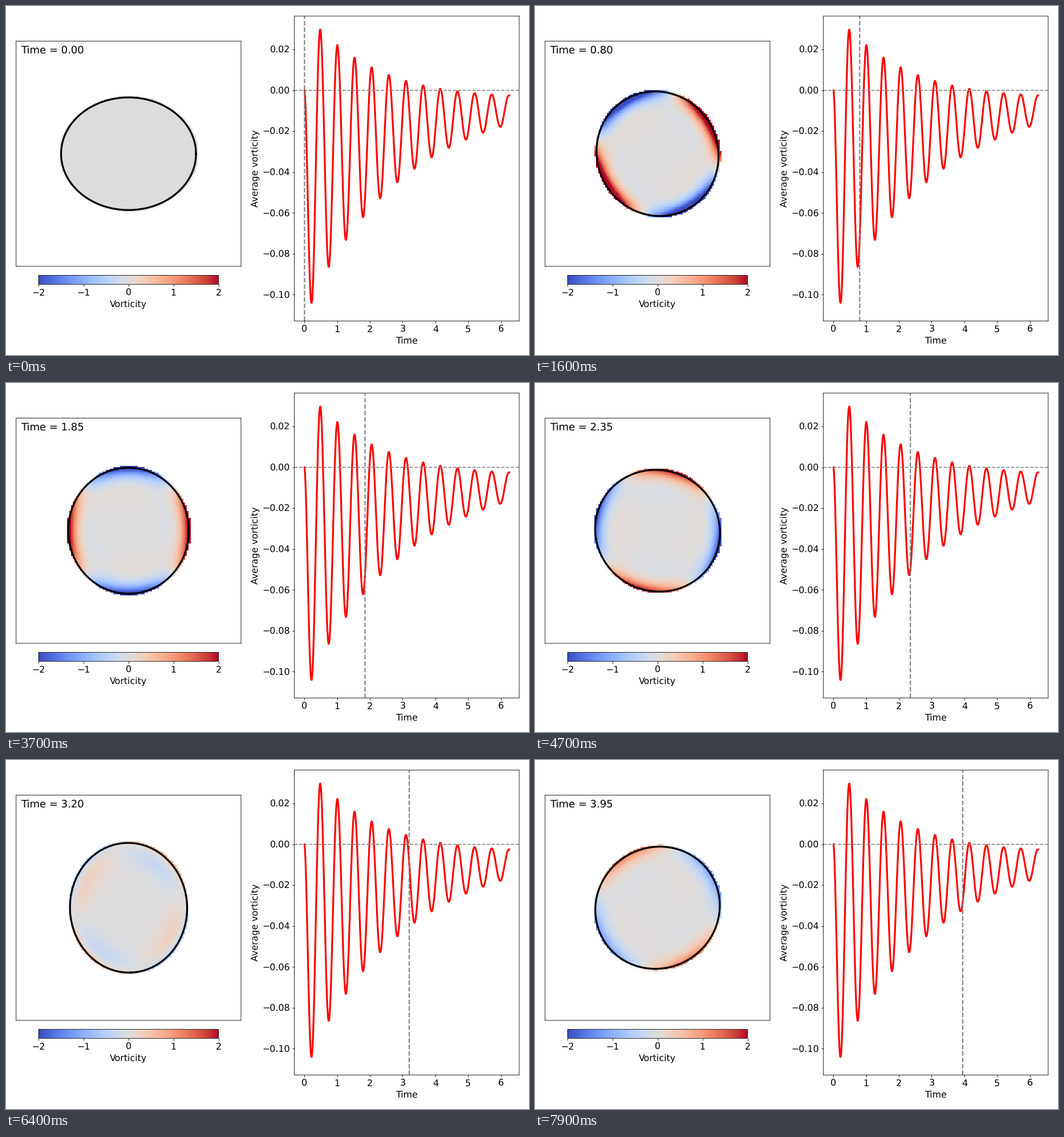
A matplotlib script that plays this animation: 917 px wide and 611 px high, repeating every 8 s.

```python
import numpy as np
import matplotlib.pyplot as plt
from matplotlib.animation import FuncAnimation

W, H, DPI = 917, 611, 64
S = 76.4 / DPI          # scales point sizes to the stage
FRAMES, DT = 80, 0.05

plt.rcParams.update({
    "font.family": "DejaVu Sans", "font.size": 15 * S,
    "text.hinting": "no_hinting", "path.snap": False,
    "axes.linewidth": 0.8 * S, "axes.labelpad": 4 * S,
    **{f"{a}tick.major.{k}": v * S for a in "xy"
       for k, v in (("size", 3.5), ("width", 0.8), ("pad", 3.5))},
})

fig = plt.figure(figsize=(W / DPI, H / DPI), dpi=DPI, facecolor="white")


def px_axes(left, top, right, bottom):
    return fig.add_axes([left / W, 1 - bottom / H, (right - left) / W, (bottom - top) / H])


drop = px_axes(17.7, 61.5, 412, 455.8)
bar = px_axes(57.1, 471.5, 372.5, 487.3)
plot = px_axes(505.5, 17.7, 899.8, 551.4)

# --- deforming drop -------------------------------------------------------
R = np.sqrt(1.2)
ROT, OMEGA = 1.0, 6.0   # precession and oscillation rates
NU = 0.11               # viscosity
NX, NY = 128, 160
X, Y = np.meshgrid((np.arange(NX) + 0.5) * 4 / NX - 2, (np.arange(NY) + 0.5) * 4 / NY - 2)
XY = X + 1j * Y
TURN = np.exp(1j * np.linspace(0, 2 * np.pi, 241))


def shape(t):
    """Log half-axis ratio and tilt of the ellipse."""
    p = 0.0912 * np.exp(-0.17 * t) * np.cos(OMEGA * t)
    q = 0.02 * np.sin(OMEGA * t)
    z = np.exp(-1j * ROT * t) * (p + 1j * q)
    return abs(z), np.angle(z) / 2


def outline(t):
    e, tilt = shape(t)
    return R * np.exp(1j * tilt) * (np.exp(e) * TURN.real + 1j * np.exp(-e) * TURN.imag)


def vorticity(t):
    """Two-lobed viscous boundary layer under the moving surface."""
    e, tilt = shape(t)
    local = XY * np.exp(-1j * tilt) / R
    rho = np.hypot(local.real * np.exp(-e), local.imag * np.exp(e))
    depth = R * (1 - rho)
    slow, fast = OMEGA - ROT, OMEGA + ROT
    k1, k2 = np.sqrt(slow / (2 * NU)), np.sqrt(fast / (2 * NU))
    wave = (np.exp(1j * slow * t - k1 * depth * (1 + 1j))
            - np.exp(-1j * fast * t - k2 * depth * (1 - 1j)))
    grown = np.exp(-depth ** 2 / (4 * NU * t)) if t else 0
    amp = -2.1 * np.exp(-0.3 * t + 0.3j) * grown * rho
    field = (amp * wave * np.exp(-2j * np.angle(XY))).real
    return np.ma.masked_where(rho > 1.026, field)


image = drop.imshow(vorticity(0), extent=(-2, 2, -2, 2), origin="lower", aspect="auto",
                    cmap="coolwarm", vmin=-2, vmax=2, interpolation="nearest")
edge, = drop.plot([], [], color="black", lw=3 * S)
drop.set(xlim=(-2, 2), ylim=(-2, 2), xticks=[], yticks=[])
clock = drop.text(0.02, 0.98, "", transform=drop.transAxes, va="top", fontsize=17 * S)

cbar = fig.colorbar(image, cax=bar, orientation="horizontal", ticks=range(-2, 3))
cbar.set_label("Vorticity")

# --- average vorticity ----------------------------------------------------


def average(t):
    """Damped ringing about a decaying mean, with a short start-up transient."""
    ring = 0.0743 * np.exp(-0.376 * t) * np.cos(11.98 * (t - 0.481))
    return ring - 0.0354 * np.exp(-0.21 * t) - 0.029 * np.exp(-t / 0.08)


ts = np.linspace(0, 6.26, 401)
plot.plot(ts, average(ts), color="red", lw=3 * S)
plot.axhline(0, color="gray", ls="--", lw=1.5 * S)
marker = plot.axvline(0, color="gray", ls="--", lw=2 * S)
plot.set(xlim=(-0.3125, 6.5625), ylim=(-0.1129, 0.03634), xticks=range(7),
         yticks=np.arange(-0.10, 0.03, 0.02), xlabel="Time", ylabel="Average vorticity")
plot.yaxis.set_major_formatter(lambda v, _: f"{v + 1e-9:.2f}".replace("-", "\u2212"))


def update(i):
    t = i * DT
    image.set_data(vorticity(t))
    rim = outline(t)
    edge.set_data(rim.real, rim.imag)
    clock.set_text(f"Time = {t:.2f}")
    marker.set_xdata([t, t])
    return image, edge, clock, marker


anim = FuncAnimation(fig, update, frames=FRAMES, interval=100, repeat=True, repeat_delay=0)
plt.show()
```
